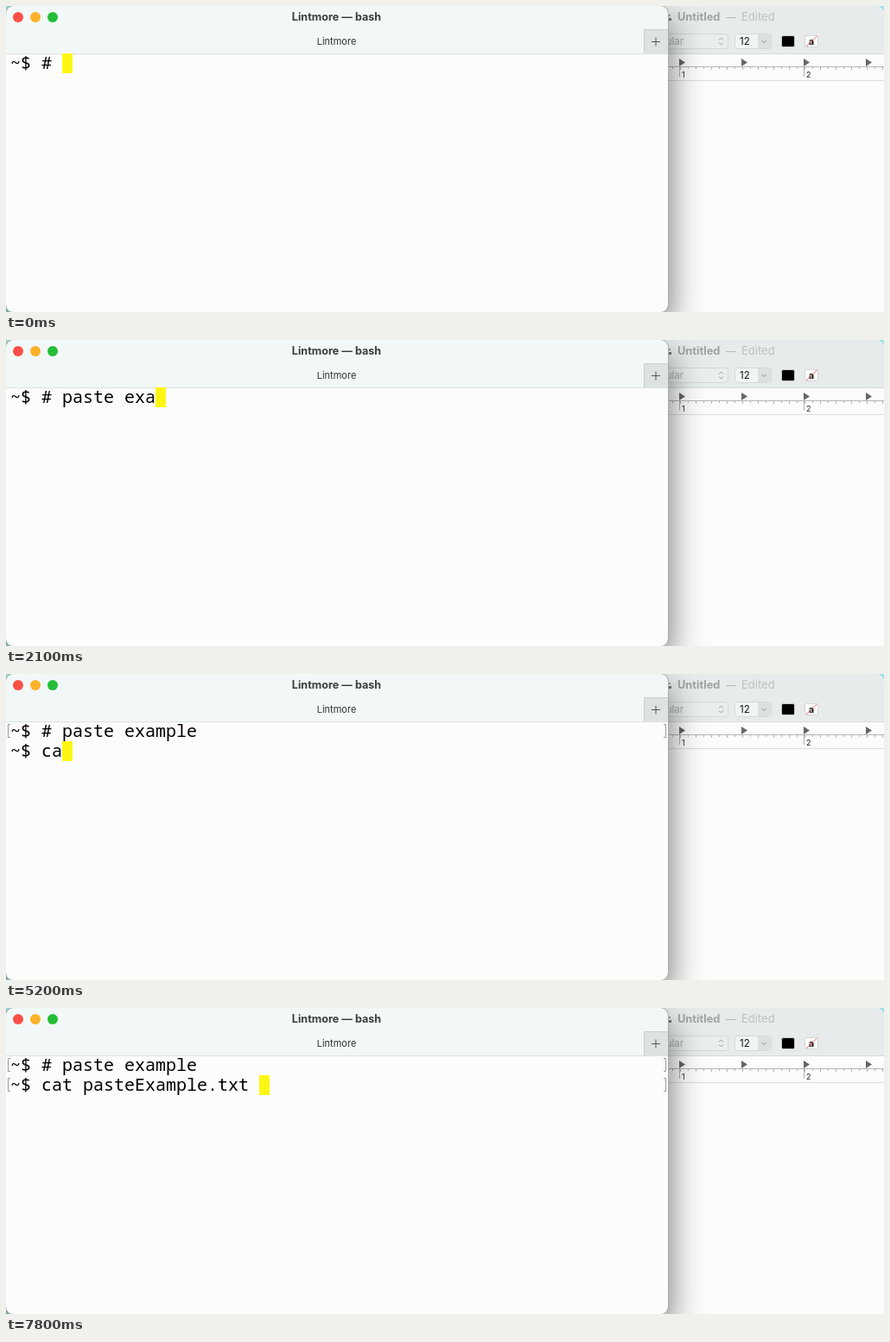
Write an HTML page with a canvas that moves like this. It is 1016 px wide and 355 px high and loops after 8 s.

```html
<!DOCTYPE html>
<html lang="en">
<head>
<meta charset="utf-8">
<title>Paste example</title>
<style>
  html, body { margin: 0; width: 100%; height: 100%; overflow: hidden; background: #fcfcfc; }
  canvas { display: block; width: 1016px; height: 355px; }
</style>
</head>
<body>
<canvas id="stage" width="1016" height="355"></canvas>
<script>
const LOOP = 8000;
const UI = 'Inter, sans-serif';
const MONO = '"Noto Sans Mono", monospace';
const APP = 'Lintmore';
const CELL = 12, ROW = 23, LEFT = 5, TOP = 55;

// Each entry: time of the key press, text it adds.
const LINE_1 = [[100, 'p'], [200, 'a'], [600, 's'], [900, 't'], [1300, 'e'], [1500, ' '],
  [1700, 'e'], [1900, 'x'], [2100, 'a'], [2400, 'm'], [2600, 'p'], [2800, 'l'], [3000, 'e']];
const LINE_2 = [[4600, 'c'], [4900, 'a'], [5300, 't'], [5600, ' '],
  [6300, 'p'], [6500, 'a'], [6700, 's'], [7200, 'teExample.txt ']];
const ENTER_1 = 3300, ENTER_2 = 7700;

const ctx = document.getElementById('stage').getContext('2d');

function rect(x, y, w, h, color) {
  ctx.fillStyle = color;
  ctx.fillRect(x, y, w, h);
}

function roundBox(x, y, w, h, r, fill, stroke) {
  ctx.beginPath();
  ctx.roundRect(x, y, w, h, r);
  if (fill) { ctx.fillStyle = fill; ctx.fill(); }
  if (stroke) { ctx.lineWidth = 1; ctx.strokeStyle = stroke; ctx.stroke(); }
}

function path(points, color, width = 1) {
  ctx.beginPath();
  points.forEach(([x, y], i) => i ? ctx.lineTo(x, y) : ctx.moveTo(x, y));
  ctx.strokeStyle = color;
  ctx.lineWidth = width;
  ctx.stroke();
}

function label(text, x, y, font, color, align = 'left') {
  ctx.font = font;
  ctx.fillStyle = color;
  ctx.textAlign = align;
  ctx.fillText(text, x, y);
}

function ruler() {
  rect(760, 70, 256, 1, '#b4b4b4');
  for (let i = 0; i * 9 < 256; i++) {
    const x = 762 + i * 9;
    rect(x, 70, 1, i % 2 ? 3 : 4, '#b4b4b4');
  }
  [780, 924].forEach((x, i) => {
    rect(x - 1, 70, 1, 12, '#b0b0b0');
    label(i + 1, x + 2, 83, `9px ${UI}`, '#222');
  });
  ctx.fillStyle = '#666';
  for (let x = 779; x < 1016; x += 72) {
    ctx.beginPath();
    ctx.moveTo(x, 61);
    ctx.lineTo(x + 7, 65.5);
    ctx.lineTo(x, 70);
    ctx.fill();
  }
}

function editorWindow() {
  rect(0, 0, 1016, 355, '#9fdfe4');
  roundBox(600, 0, 416, 380, 9, '#fcfcfc');
  roundBox(600, 0, 416, 55, [9, 9, 0, 0], '#e7ebeb');
  rect(600, 55, 416, 1, '#d8dada');
  rect(600, 86, 416, 1, '#dcdcdc');

  rect(766, 10, 3, 2, '#999');
  rect(766, 14, 4, 3, '#777');
  label('Untitled', 777, 17, `bold 12.8px ${UI}`, '#a0a3a3');
  label('—', 833, 17, `12px ${UI}`, '#b6b9b9');
  label('Edited', 851, 17, `13px ${UI}`, '#bdc0c0');

  roundBox(700.5, 32.5, 135, 17, 3, '#eaeeee', '#d5d8d8');
  label('ular', 784, 45, `11.5px ${UI}`, '#a9acac', 'right');
  path([[825, 39.5], [827.5, 37], [830, 39.5]], '#999');
  path([[825, 42.5], [827.5, 45], [830, 42.5]], '#999');

  roundBox(843.5, 32.5, 42, 17, 3, '#f2f5f5', '#d5d8d8');
  roundBox(870, 33, 15, 16, [0, 3, 3, 0], '#dce0e0');
  label('12', 849, 45, `11.5px ${UI}`, '#111');
  path([[874.5, 40], [877, 42.5], [879.5, 40]], '#8c8f8f');

  roundBox(897.5, 34.5, 15, 13, 2, '#000', '#c8cbcb');
  roundBox(924.5, 34.5, 15, 13, 2, '#fdfdfd', '#d2d5d5');
  label('a', 932, 45, `bold 11px ${UI}`, '#111', 'center');
  path([[926, 47], [938.5, 35]], '#e0685c');
  ruler();
}

function shellWindow() {
  ctx.save();
  ctx.shadowColor = 'rgba(0,0,0,0.58)';
  ctx.shadowBlur = 40;
  ctx.shadowOffsetY = 18;
  roundBox(0, 0, 766, 356, 9, '#fcfcfc');
  ctx.restore();
  roundBox(0, 0, 766, 55, [9, 9, 0, 0], '#f2f8f7');
  rect(0, 55, 766, 1, '#dde1e1');

  ['#fb5048', '#fbb12a', '#25bd37'].forEach((color, i) => {
    ctx.beginPath();
    ctx.arc(14 + i * 20, 13, 6, 0, Math.PI * 2);
    ctx.fillStyle = color;
    ctx.fill();
  });
  label(`${APP} — bash`, 382.5, 17, `bold 12.6px ${UI}`, '#3a3d3d', 'center');
  label(APP, 382.5, 45, `11px ${UI}`, '#303333', 'center');

  rect(738, 27, 28, 28, '#dee3e2');
  path([[738.5, 55], [738.5, 27.5], [766, 27.5]], '#c9cecd');
  path([[747, 41.5], [757, 41.5]], '#555');
  path([[752, 36.5], [752, 46.5]], '#555');
  roundBox(-0.5, -0.5, 767, 356, 9, null, '#a9acac');
}

function typed(keys, t) {
  return keys.filter(([at]) => t >= at).map(([, text]) => text).join('');
}

function brackets(row) {
  const y = TOP + 3.5 + row * ROW;
  path([[5, y], [2.5, y], [2.5, y + 15], [5, y + 15]], '#9a9a9a');
  path([[761, y], [763.5, y], [763.5, y + 15], [761, y + 15]], '#9a9a9a');
}

function promptLine(text, row) {
  label(text, LEFT, TOP + 18 + row * ROW, `500 20px ${MONO}`, '#000');
}

function draw(t) {
  editorWindow();
  shellWindow();
  const lines = ['~$ # ' + typed(LINE_1, t)];
  if (t >= ENTER_1) {
    lines.push('~$ ' + typed(LINE_2, t));
    brackets(0);
  }
  if (t >= ENTER_2) brackets(1);
  const last = lines.length - 1;
  rect(LEFT + lines[last].length * CELL, TOP + last * ROW, CELL, ROW, '#fff614');
  lines.forEach(promptLine);
}

const start = performance.now();
function tick() {
  draw((performance.now() - start) % LOOP);
  requestAnimationFrame(tick);
}
tick();
</script>
</body>
</html>
```
